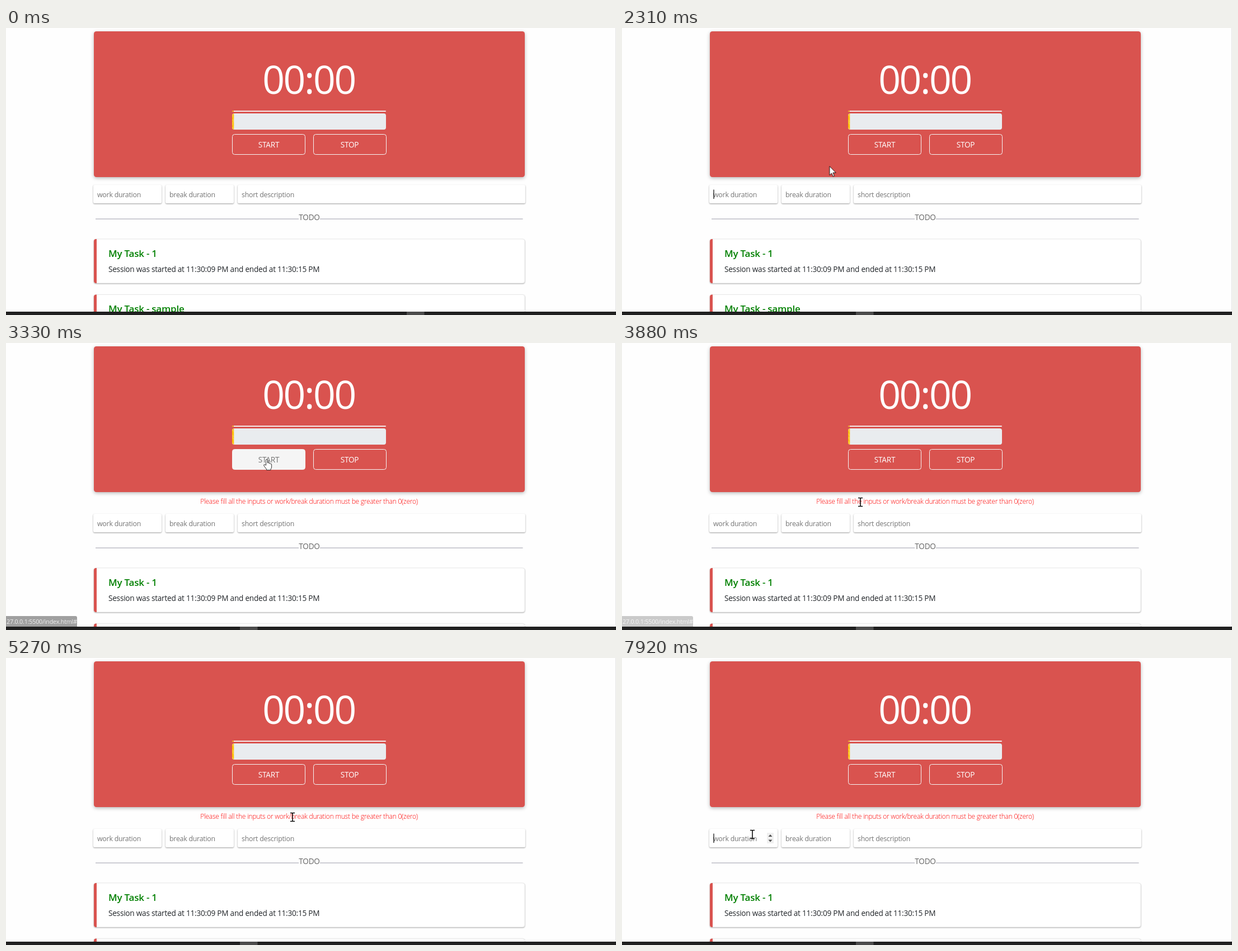
Write an HTML page that moves like this. It is 1090 px wide and 514 px high and loops after 8000 ms.

```html
<!DOCTYPE html>
<html lang="en">
<head>
<meta charset="utf-8">
<title>Task timer</title>
<style>
  html, body { margin: 0; width: 100%; height: 100%; overflow: hidden; background: #fefefe; }
  svg { display: block; width: 1090px; height: 514px; font: 13.6px "Open Sans", "Noto Sans", sans-serif; letter-spacing: -.017em; }
  .anim { animation: 8s -10ms infinite step-end both; }
  .panel { fill: #d9534f; filter: drop-shadow(0 2px 3px rgba(0,0,0,.28)); }
  .box { fill: #fff; filter: drop-shadow(0 1px 1.3px rgba(0,0,0,.4)); }
  .clock { font-size: 69.5px; letter-spacing: -.034em; fill: #fff; }
  .button rect { fill: none; stroke: #f5f5f5; }
  .button text { fill: #fff; }
  .mid { text-anchor: middle; }
  .hint { font-size: 12.35px; fill: #757575; }
  .title { font-size: 17px; font-weight: 600; fill: green; }
  .alert { font-size: 12px; font-weight: 300; fill: red; }
  .status text { font-size: 10.8px; fill: #eee; }
  .stripes { animation: slide 1s linear infinite; }
  .page { animation-name: page; }
  .alert { animation-name: alert; }
  .start rect { animation-name: hotBox; animation-timing-function: linear; }
  .start text { animation-name: hotText; animation-timing-function: linear; }
  .spin { animation-name: spin; }
  .caret { animation-name: caret; }
  .status { animation-name: status; animation-timing-function: linear; }
  .task { animation-name: task; }
  .cursor { animation-name: path; }
  .click { animation-name: click; }
  .arrow { animation-name: arrow; }
  .hand { animation-name: hand; }
  .beam { animation-name: beam; }

  @keyframes slide { from { transform: translateX(0); } to { transform: translateX(-14px); } }
  @keyframes page { 0% { transform: none; } 37.625%, 100% { transform: translateY(25px); } }
  @keyframes alert { 0% { opacity: 0; } 37.625%, 100% { opacity: 1; } }
  @keyframes hotBox {
    0%, 31% { fill: rgba(245,245,245,0); } 32.8%, 43.5% { fill: #f5f5f5; } 45.2%, 100% { fill: rgba(245,245,245,0); }
  }
  @keyframes hotText { 0%, 31% { fill: #fff; } 32.8%, 43.5% { fill: #757575; } 45.2%, 100% { fill: #fff; } }
  @keyframes spin { 0%, 26.1% { opacity: 0; } 15.4%, 78.6%, 100% { opacity: 1; } }
  @keyframes caret { 0%, 29.6%, 88.9% { opacity: 0; } 23.3%, 82.6%, 95.1%, 100% { opacity: 1; } }
  @keyframes status { 0%, 32% { opacity: 0; } 33%, 47.2% { opacity: 1; } 50.4%, 100% { opacity: 0; } }
  @keyframes task { 0% { transform: none; } 24.2%, 100% { transform: translateX(-298px); } }
  @keyframes click { 0%, 25.1%, 37.6%, 84.5% { opacity: 0; } 23.3%, 35.6%, 82.5% { opacity: 1; } 100% { opacity: 0; } }
  @keyframes arrow { 0%, 15.4%, 31%, 46.4%, 100% { opacity: 0; } .875%, 26.1%, 44.5% { opacity: 1; } }
  @keyframes hand { 0%, 44.5%, 100% { opacity: 0; } 31% { opacity: 1; } }
  @keyframes beam { 0%, 26.1% { opacity: 0; } 15.4%, 46.4%, 100% { opacity: 1; } }
  @keyframes path {
    0% { transform: translate(1069px,497px); }
    .875% { transform: translate(1069px,497px); animation-timing-function: steps(10); }
    10.625% { transform: translate(488px,346px); }
    11.625% { transform: translate(440px,338px); animation-timing-function: steps(5); }
    16.375% { transform: translate(267px,310px); animation-timing-function: steps(5); }
    21.25% { transform: translate(244px,299px); }
    25.125% { transform: translate(244px,299px); animation-timing-function: steps(7); }
    31.875%, 42.625% { transform: translate(466px,209px); }
    43.5% { transform: translate(460px,218px); animation-timing-function: steps(5); }
    48.5% { transform: translate(426px,285px); animation-timing-function: steps(5); }
    53.375% { transform: translate(537px,285px); animation-timing-function: steps(6); }
    59.25% { transform: translate(728px,304px); animation-timing-function: steps(5); }
    64% { transform: translate(566px,286px); animation-timing-function: steps(2); }
    65.875% { transform: translate(512px,285px); animation-timing-function: steps(9); }
    74.75% { transform: translate(363px,286px); animation-timing-function: steps(5); }
    79.625% { transform: translate(238px,318px); animation-timing-function: steps(2); }
    81.625% { transform: translate(229px,322px); }
    85.625% { transform: translate(229px,322px); animation-timing-function: steps(4); }
    96.125%, 100% { transform: translate(233px,316px); }
  }
</style>
</head>
<body>
<svg viewBox="0 0 1090 514">
  <defs>
    <pattern id="stripe" width="14" height="14" patternUnits="userSpaceOnUse">
      <rect width="14" height="14" fill="#ffc107"/>
      <path d="M0 0H3.5L14 10.5V14L0 0M0 7L7 14H0M7 0H14V7Z" fill="#fff" opacity=".15"/>
    </pattern>
    <clipPath id="bar"><path d="M407.3 153V182Q404 181 404 178V157Q404 154 407.3 153"/></clipPath>
    <g id="card">
      <rect class="box" x="157" y="378" width="770" height="79" rx="4"/>
      <rect x="157" y="378" width="770" height="79" rx="4" fill="none" stroke="#e2e2e2" stroke-width=".7"/>
      <path d="M162 378H161Q157 378 157 382V453Q157 457 161 457H162Z" fill="#d9534f"/>
    </g>
  </defs>

  <rect width="1090" height="514" fill="#fefefe"/>
  <path d="M1089.5 0V508" stroke="#e4e4e4"/>

  <rect class="panel" x="157" y="6" width="770" height="261" rx="4.5"/>
  <text class="clock mid" x="541" y="117.5">00:00</text>
  <rect x="404" y="148" width="275" height="2" rx="1" fill="#f4e9ea"/>
  <rect x="404" y="148" width="3" height="2" fill="#f0ad2e"/>
  <rect x="404" y="153" width="275" height="29" rx="4" fill="#e9ecef"/>
  <g clip-path="url(#bar)"><rect class="stripes" x="390" y="140" width="60" height="56" fill="url(#stripe)"/></g>
  <g class="button start">
    <rect class="anim" x="404.5" y="190.5" width="130" height="36" rx="4"/>
    <text class="anim mid" x="469.5" y="214">START</text>
  </g>
  <g class="button">
    <rect x="549.5" y="190.5" width="130" height="36" rx="4"/>
    <text class="mid" x="614" y="214">STOP</text>
  </g>

  <text class="alert anim mid" x="541.5" y="288">Please fill all the inputs or work/break duration must be greater than 0(zero)</text>

  <g class="page anim">
    <rect class="box" x="156" y="281" width="122" height="33" rx="2.5"/>
    <rect class="box" x="285" y="281" width="122" height="33" rx="2.5"/>
    <rect class="box" x="414" y="281" width="514" height="33" rx="2.5"/>
    <g class="hint">
      <text x="163" y="302.5">work duration</text>
      <text x="292" y="302.5">break duration</text>
      <text x="421" y="302.5">short description</text>
    </g>
    <g class="spin anim">
      <rect x="259" y="288" width="12" height="19" fill="#f0f0f0"/>
      <path d="M261.5 295L265 291L268.500 295ZM261.5 300.500L265 304.500L268.500 300.500Z" fill="#505050"/>
    </g>
    <path class="caret anim" d="M164 289.500V306" stroke="#000" stroke-width="1.2"/>

    <path d="M160 342H523M561 342H923.500" stroke="#cdcdd4" stroke-width="1.8"/>
    <text class="mid" x="542" y="343.500" fill="#666">TODO</text>

    <use href="#card"/>
    <text class="title" x="183" y="409.500">My Task - 1</text>
    <text x="183" y="436.500" fill="#212529">Session was started at 11:30:09 PM and ended at 11:30:15 PM</text>
    <use href="#card" y="99.500"/>
    <text class="title" x="183" y="509">My Task - sample</text>
  </g>

  <g class="status anim">
    <path d="M0 489H124Q127 489 127 492V508H0Z" fill="#a0a0a0"/>
    <text x="1" y="502.500">27.0.0.1:5500/index.html#</text>
  </g>
  <rect y="508" width="1090" height="6" fill="#202020"/>
  <rect class="task anim" x="716" y="508" width="31.500" height="6" fill="#4c4c4c"/>

  <g class="cursor anim">
    <circle class="click anim" r="11" fill="#fff200" fill-opacity=".7"/>
    <path class="arrow anim" d="M0 0V16L3.700 12.500L6.200 18.300L8.600 17.300L6.200 11.600H11.300Z" fill="#fff" stroke="#000" stroke-width=".9"/>
    <path class="hand anim" d="M-1.400 10V1Q-1.400-.8 0-.8T1.500 1V6Q3-.0 4 6.800Q5.800 5.300 6.500 7.500Q8.500 6.500 8.600 9V13Q8.600 15 7 17V18.500H-.5V17L-5 11Q-6 8.500-3.800 8.600Z" fill="#fff" stroke="#222" stroke-width=".9"/>
    <path class="beam anim" d="M-4-7.500H-1Q0-7.500 0-6.500Q0-7.500 1-7.500H4M0-6.500V6.500M-4 7.500H-1Q0 7.500 0 6.500Q0 7.500 1 7.500H4" fill="none" stroke="#000" stroke-width="1.5"/>
  </g>
</svg>
</body>
</html>
```
